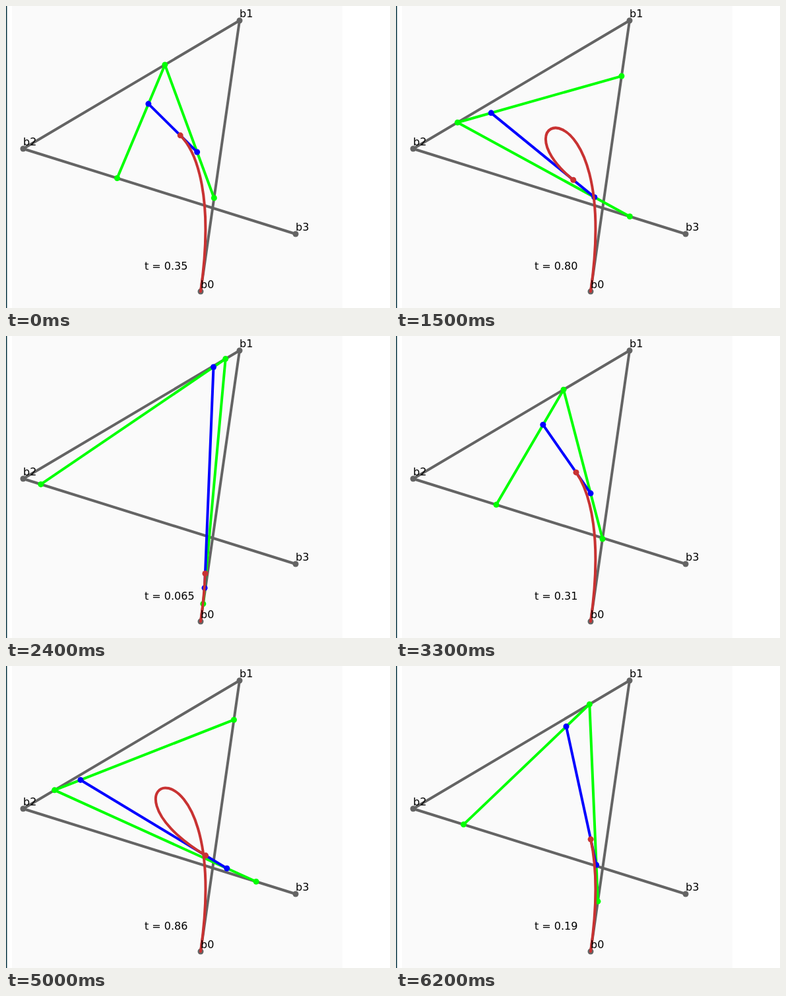
Write an HTML page that moves like this. It is 582 px wide and 457 px high and loops after 6.3 s.

```html
<!DOCTYPE html>
<html lang="en">
<head>
<meta charset="utf-8">
<title>De Casteljau construction</title>
<style>
  html, body { margin: 0; width: 100%; height: 100%; overflow: hidden; background: #fff; }
  svg { display: block; }
  text { font: 16px "DejaVu Sans", sans-serif; fill: #000; }
  path { fill: none; stroke-width: 4; stroke-linecap: round; stroke-linejoin: round; }
</style>
</head>
<body>
<svg id="stage" width="582" height="457" viewBox="0 0 582 457">
  <rect width="1.5" height="457" fill="#0a3644"/>
  <rect x="9" width="501" height="457" fill="#fafafa"/>
</svg>
<script>
const LOOP = 6300, STEP = 100;
const CONTROL = [[295, 432], [354, 22], [26, 216], [439, 345]];
const COLORS = ['#646464', '#00ff00', '#0000ff', '#c83232'];

// [time in ms, unwrapped parameter]; flat stretches are stalls
const PACE = [
  [0, .345], [2400, 1.065], [2600, 1.065], [2700, 1.125], [3300, 1.305],
  [4000, 1.52], [4500, 1.67], [4600, 1.735], [4700, 1.735], [4900, 1.795],
  [5000, 1.855], [5100, 1.855], [5200, 1.9], [5800, 2.08], [6200, 2.185]
];

const stage = document.getElementById('stage');

function add(tag, attrs, content = '') {
  const node = document.createElementNS('http://www.w3.org/2000/svg', tag);
  for (const name in attrs) node.setAttribute(name, attrs[name]);
  node.textContent = content;
  return stage.appendChild(node);
}

const mix = (a, b, t) => a + (b - a) * t;
const polyline = points => 'M' + points.join('L');

// Each level interpolates between neighbours of the one before
function casteljau(t) {
  const levels = [CONTROL];
  while (levels.at(-1).length > 1) {
    const last = levels.at(-1);
    levels.push(last.slice(1).map((p, i) => p.map((v, axis) => mix(last[i][axis], v, t))));
  }
  return levels;
}

function parameterAt(time) {
  const i = PACE.findIndex(([end]) => end >= time);
  if (i === 0) return PACE[0][1];
  const [[t0, v0], [t1, v1]] = [PACE[i - 1], PACE[i]];
  const value = mix(v0, v1, (time - t0) / (t1 - t0));
  return (Math.round(value * 200) % 200) / 200;
}

const layers = COLORS.map((color, depth) => ({
  line: add('path', { stroke: color }),
  dots: CONTROL.slice(depth).map(() => add('circle', { r: 4.5, fill: color }))
}));
CONTROL.forEach(([x, y], i) => add('text', { x, y: y - 5 }, 'b' + i));
const label = add('text', { x: 210, y: 399 });

function draw(time) {
  const t = parameterAt(Math.floor((time % LOOP) / STEP) * STEP);
  const levels = casteljau(t);
  layers.forEach(({ line, dots }, depth) => {
    const points = levels[depth];
    const curve = `M${levels[0][0]}C${levels.slice(1).map(level => level[0]).join(' ')}`;
    line.setAttribute('d', depth === 3 ? curve : polyline(points));
    dots.forEach((dot, i) => {
      dot.setAttribute('cx', points[i][0]);
      dot.setAttribute('cy', points[i][1]);
    });
  });
  label.textContent = 't = ' + (t + 1e-6).toPrecision(2);
}

const start = performance.now();
function tick() {
  draw(performance.now() - start);
  requestAnimationFrame(tick);
}
tick();
</script>
</body>
</html>
```
